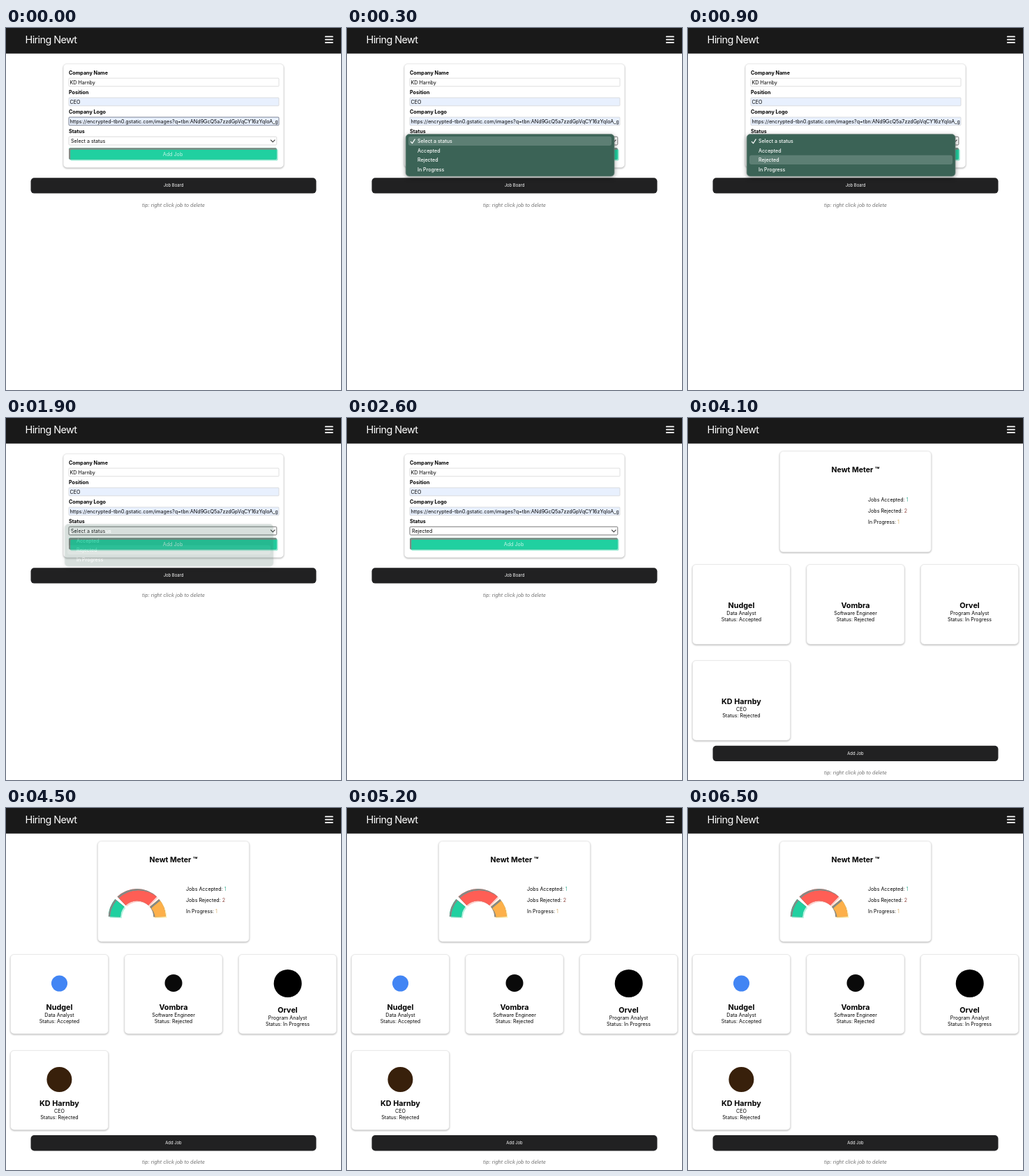
An HTML page for the animation above (6600 ms loop, 480 by 520 pixels).

```html
<!DOCTYPE html>
<html lang="en">
<head>
<meta charset="utf-8">
<title>Job tracker</title>
<style>
  html, body { margin: 0; width: 100%; height: 100%; overflow: hidden; background: #fff; }
  svg { display: block; width: 480px; height: 520px; }
  text { font-family: Inter, "Open Sans", sans-serif; white-space: pre; }
  .card { fill: #fff; stroke: #e2e2e2; stroke-width: .6; filter: drop-shadow(0 1.1px 1.3px rgba(0, 0, 0, .3)); }
  .menu { filter: drop-shadow(0 2px 3px rgba(0, 0, 0, .4)); }
</style>
</head>
<body>
<svg id="stage" viewBox="0 0 480 520" xmlns="http://www.w3.org/2000/svg"></svg>
<script>
const LOOP = 6600, STEP = 100;
const TIMES = { focus: 200, open: 300, accepted: 400, rejected: 500, blinkOff: 1600, blinkOn: 1700,
                fade: 1800, chosen: 2000, board: 4000, loaded: 4200 };
const ROWS = [162.5, 176, 189.5, 203];
const ITEMS = ["Select a status", "Accepted", "Rejected", "In Progress"];
const GREEN = "#20d0a0", RED = "#ff5e55", ORANGE = "#fdb04a", SHADE = "#858a86";
let clips = 0;

const rect = (x, y, x2, y2, r, attrs) =>
  `<rect x="${x}" y="${y}" width="${x2 - x}" height="${y2 - y}" rx="${r}" ${attrs}/>`;

// y is the middle of the capitals
const text = (x, y, str, size = 7.1, attrs = "") =>
  `<text x="${x}" y="${y + size * .36}" font-size="${size}" ${attrs}>${str}</text>`;

const mid = (x, y, str, size, attrs = "") => text(x, y, str, size, `text-anchor="middle" ${attrs}`);
const card = (x, y, x2, y2) => rect(x, y, x2, y2, 5, 'class="card"');
const disc = (x, y, r, fill) => `<circle cx="${x}" cy="${y}" r="${r}" fill="${fill}"/>`;
const group = (id, body) => `<g id="${id}">${body}</g>`;

// Coloured shape with a grey inner shade at top left and a pale glow below
function bevel(d, color, glow) {
  const id = "clip" + clips++;
  return `<clipPath id="${id}"><path d="${d}"/></clipPath>
    <path d="${d}" fill="${glow}" transform="translate(1.8 1.8)" filter="url(#soft)"/>
    <path d="${d}" fill="${color}"/>
    <g clip-path="url(#${id})"><path d="${d}" fill="none" stroke="${SHADE}" stroke-width="3"
        transform="translate(1.2 1.2)" filter="url(#soft)"/>
      <path d="${d}" fill="${color}" transform="translate(2.4 2.4)" filter="url(#soft)"/></g>`;
}

function arc(from, to) {
  const at = (r, deg) => {
    const a = deg * Math.PI / 180;
    return `${187.7 + r * Math.cos(a)} ${157 - r * Math.sin(a)}`;
  };
  const R = 41, r = 23.7;
  return `M${at(R, from)}A${R} ${R} 0 0 1 ${at(R, to)}L${at(r, to)}A${r} ${r} 0 0 0 ${at(r, from)}Z`;
}

const bar = (y, label) => rect(35.5, y, 444.5, y + 22.4, 5, 'fill="#212122"') +
  mid(240, y + 11, label, 5.9, 'fill="#fff"');
const tip = y => mid(240, y, "tip: right click job to delete", 7.2, 'fill="#707070" font-style="italic"');

function field(id, y, fill) {
  return rect(90, y - 5.9, 391, y + 5.8, 1, `id="${id}" fill="${fill}" stroke="#d2d2d2" stroke-width=".7"`);
}

function formView() {
  const labels = ["Company Name", "Position", "Company Logo", "Status"];
  const url = "https://encrypted-tbn0.gstatic.com/images?q=tbn:ANd9GcQ5a7zzdGpVqCY16zYqIoA_g";
  return card(82.2, 51.6, 397.8, 200.4) +
    labels.map((s, i) => text(90, 64 + 28 * i, s, 7.2, 'font-weight="700"')).join("") +
    field("name", 78, "#fff") + text(91.5, 78, "KD Harnby") +
    field("position", 106, "#e8f0fe") + text(91.5, 106, "CEO") +
    field("logo", 134, "#e8f0fe") +
    `<g clip-path="url(#urlBox)">${text(91.5, 134, url, 7.2)}</g>` +
    rect(90, 156.2, 387.8, 168, 1.5, 'id="select" fill="#fff" stroke-width=".8"') +
    text(93, 162.3, ITEMS[0], 7.1, 'id="choice"') +
    '<path d="M379.2 160.6L382.3 163.8L385.4 160.6" fill="none" stroke="#333" stroke-width="1.1"/>' +
    bevel("M92 172.3H386Q387.8 172.3 387.8 174V187Q387.8 188.8 386 188.8H92Q90 188.8 90 187V174Q90 172.3 92 172.3Z",
      GREEN, "#8fe9d0") +
    mid(239, 181, "Add Job", 7.2, 'fill="#c4f4e6"') +
    bar(215.2, "Job Board") + tip(254) + menuView();
}

function menuView() {
  const rows = ITEMS.map((s, i) => text(101, ROWS[i], s, 7.1, 'fill="#fff" font-weight="500"')).join("");
  return group("menu",
    rect(84.2, 152.6, 383, 213, 5, 'class="menu" fill="#3b6356" stroke="#6d857c" stroke-width=".7"') +
    rect(88, 0, 379, 13.2, 3, 'id="mark" fill="#5d7f74"') + rows +
    '<path d="M91.4 163.3L93.5 165.7L97.2 159.9" fill="none" stroke="#fff" stroke-width="1.2" stroke-linecap="round" stroke-linejoin="round"/>');
}

function job(x, y, name, role, status) {
  return mid(x, y, name, 10.8, 'font-weight="700"') +
    mid(x, y + 11, role, 7.1) + mid(x, y + 20, "Status: " + status, 7.1);
}

function boardView(loaded) {
  const up = loaded ? .7 : 0;
  const drop = loaded ? 17 : 0;
  const tally = (y, label, n, color) =>
    text(258, y, `${label}: <tspan fill="${color}">${n}</tspan>`, 7.1);
  const boxes = [[6.5, 210.5], [170, 210.5], [333.5, 210.5], [6.5, 348.5]];
  const art = bevel(arc(178.5, 140), GREEN, "#b4f3e0") +
    bevel(arc(133.5, 46.5), RED, "#ffd0cb") +
    bevel(arc(40, 1.5), ORANGE, "#fff0b4") +
    disc(76.5, 252, 11.5, "#4285f4") + disc(240, 251.5, 12.5, "#0a0a0a") +
    disc(403.7, 252, 20, "#000") + disc(76.4, 390, 18, "#38200b");
  return card(131.6, 47.7, 348.4, 192.6 - up) +
    mid(240, 74, "Newt Meter ™", 10.5, 'font-weight="700"') +
    tally(117 - up, "Jobs Accepted", 1, "#45b59a") +
    tally(133 - up, "Jobs Rejected", 2, "#8a3f38") +
    tally(149.3 - up, "In Progress", 1, "#d9b068") +
    boxes.map(([x, y]) => card(x, y, x + 140, y + 114.5 - up)).join("") +
    job(76.5, 269 + drop, "Nudgel", "Data Analyst", "Accepted") +
    job(240, 269 + drop, "Vombra", "Software Engineer", "Rejected") +
    job(403.5, 269 + (loaded ? 21 : 0), "Orvel", "Program Analyst", "In Progress") +
    job(76.5, 407 + drop, "KD Harnby", "CEO", "Rejected") +
    (loaded ? art : "") + bar(470.7 - up, "Add Job") + tip(509 - up);
}

const burger = [12.4, 16.6, 20.9].map(y =>
  `<path d="M457.8 ${y}H467.9" stroke="#fff" stroke-width="1.9" stroke-linecap="round"/>`).join("");

document.getElementById("stage").innerHTML =
  `<defs>
    <filter id="soft" x="-20%" y="-40%" width="140%" height="180%"><feGaussianBlur stdDeviation=".7"/></filter>
    <clipPath id="urlBox"><rect x="91" y="128" width="298.5" height="12"/></clipPath>
  </defs>
  <rect width="480" height="520" fill="#fff"/>
  <rect width="480" height="36.7" fill="#191919"/>` +
  text(27.5, 17.2, "Hiring Newt", 14.4, 'fill="#fff" letter-spacing="-.55"') + burger +
  group("form", formView()) + group("waiting", boardView(false)) + group("ready", boardView(true));

const el = id => document.getElementById(id);
const show = (id, on) => el(id).setAttribute("display", on ? "inline" : "none");

function menuOpacity(t) {
  if (t < TIMES.open || t >= TIMES.chosen) return 0;
  return t < TIMES.fade ? 1 : .6 - .4 * (t - TIMES.fade) / STEP;
}

function hovered(t) {
  if (t >= TIMES.blinkOff && t < TIMES.blinkOn) return -1;
  return t < TIMES.accepted ? 0 : t < TIMES.rejected ? 1 : 2;
}

function draw(t) {
  show("form", t < TIMES.board);
  show("waiting", t >= TIMES.board && t < TIMES.loaded);
  show("ready", t >= TIMES.loaded);

  const focused = t >= TIMES.focus;
  el("logo").setAttribute("stroke", focused ? "#d2d2d2" : "#4c5568");
  el("select").setAttribute("stroke", focused ? "#555" : "#d2d2d2");
  el("choice").textContent = ITEMS[t < TIMES.chosen ? 0 : 2];

  const row = hovered(t);
  show("mark", row >= 0);
  if (row >= 0) el("mark").setAttribute("y", ROWS[row] - 6.7);
  el("menu").setAttribute("opacity", menuOpacity(t));
}

const start = performance.now();
function tick() {
  const t = (performance.now() - start) % LOOP;
  draw(Math.floor(t / STEP) * STEP);
  requestAnimationFrame(tick);
}
tick();
</script>
</body>
</html>
```
